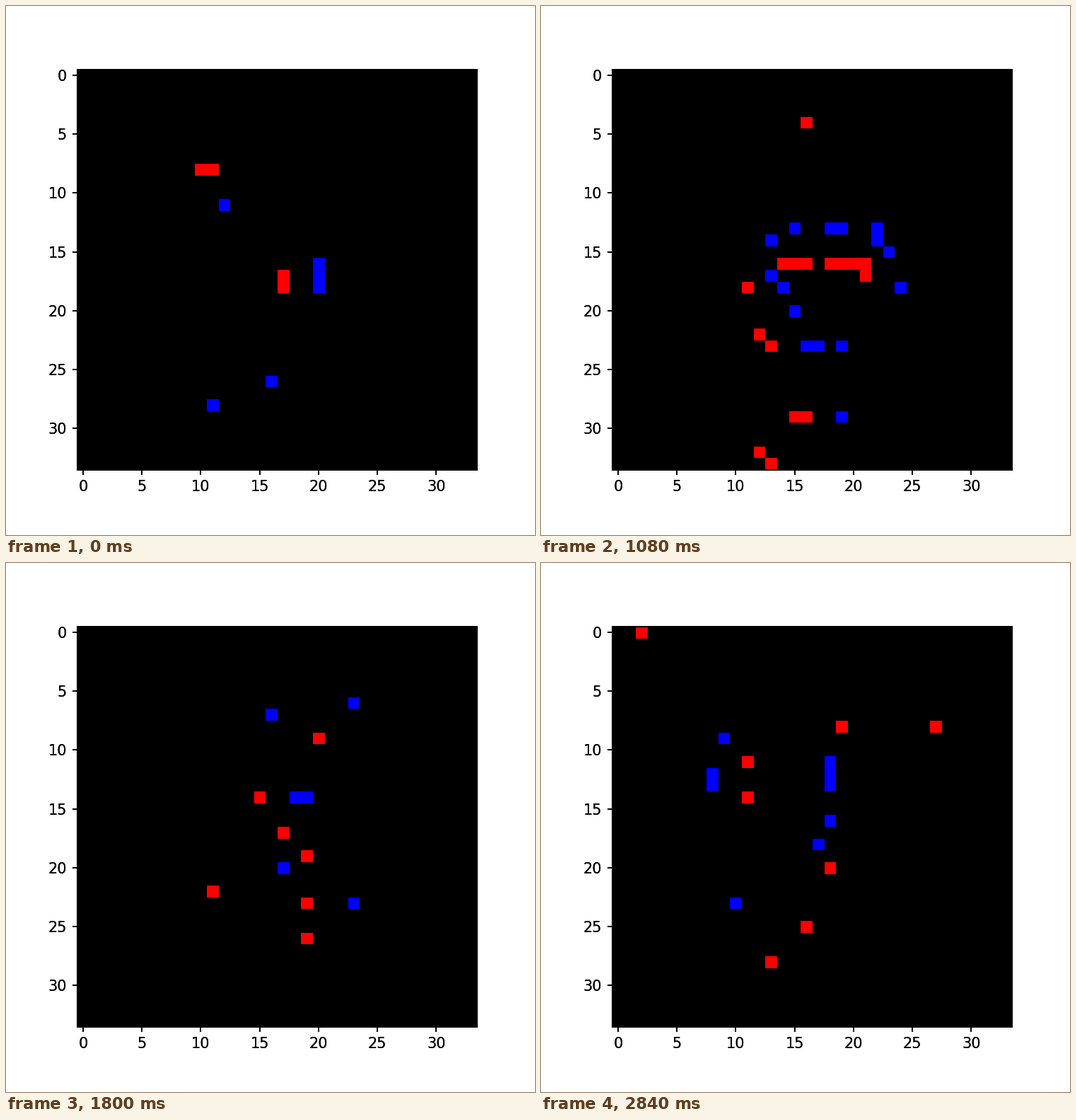
A matplotlib script for the animation above (2.88 s loop, 748 by 748 pixels).

```python
import numpy as np
import matplotlib.pyplot as plt
from matplotlib.animation import FuncAnimation

SIZE, GRID = 748, 34
FRAMES, STEP = 72, 40
SWEEP = FRAMES // 3
RED, BLUE = (255, 0, 0), (0, 0, 255)

# Centre line of the figure eight, as a closed loop of key points
EIGHT = np.array([
    (14.3, 10), (15.5, 8.7), (19, 8.6), (23, 8), (25, 10), (25, 13.5),
    (23.3, 17.5), (20, 20.3), (16.5, 22.3), (15.5, 24), (17, 25.8),
    (19.5, 25.6), (20.3, 23.5), (19.8, 21), (17.8, 17.5), (15.2, 13.7),
])
# The digit is swept around a triangle
CORNERS = np.array([(-5.2, 0.6), (-2.6, 6.2), (0.9, -0.6)])
INNER, OUTER = 0.75, 2.0    # distance of an edge from the centre line
FACING = 0.4                # how far an edge must face the motion

t = np.linspace(0, len(EIGHT), 300)
knots = np.arange(len(EIGHT) + 1)
LINE = np.column_stack([np.interp(t, knots, np.append(c, c[0])) for c in EIGHT.T])
ROWS, COLS = np.mgrid[:GRID, :GRID]
CELLS = np.stack([COLS, ROWS], axis=-1)


def ease(u):
    u = np.clip(u, 0, 1)
    return u * u * (3 - 2 * u)


def pose(leg, p):
    """Offset of the digit and its direction of travel."""
    a, b = CORNERS[leg], CORNERS[(leg + 1) % 3]
    return a + (b - a) * ease((p - 0.2) / 0.6), (b - a) / np.hypot(*(b - a))


def picture(i):
    rng = np.random.default_rng(100 + i)
    leg, step = divmod(i, SWEEP)
    p = step / SWEEP
    offset, heading = pose(leg, p)

    gap = CELLS[:, :, None] - (LINE + offset)
    dist = np.hypot(gap[..., 0], gap[..., 1])
    near = dist.argmin(axis=2)
    d = dist.min(axis=2)
    out = gap[ROWS, COLS, near] / np.maximum(d, 1e-6)[..., None]
    facing = out @ heading

    # Leading edges turn on (blue), trailing edges turn off (red)
    rate = 0.12 + 0.9 * np.exp(-((p - 0.39) / 0.17) ** 2 / 2)
    lit = (d > INNER) & (d < OUTER) & (rng.random(d.shape) < rate)
    img = np.zeros((GRID, GRID, 3), np.uint8)
    img[lit & (facing > FACING)] = BLUE
    img[lit & (facing < -FACING)] = RED

    for x, y in rng.integers(0, GRID, (rng.poisson(1), 2)):
        img[y, x] = RED
    return img


plt.rcParams.update({
    "font.family": "DejaVu Sans", "font.size": 15, "axes.linewidth": 1.44,
    "xtick.major.size": 5.25, "ytick.major.size": 5.25,
    "xtick.major.width": 1.44, "ytick.major.width": 1.44,
    "xtick.major.pad": 5.25, "ytick.major.pad": 5.25,
})
fig = plt.figure(figsize=(SIZE / 100, SIZE / 100), dpi=100, facecolor="white")
left, top, side = 100.55, 89.7, 565.9
box = [left / SIZE, 1 - (top + side) / SIZE, side / SIZE, side / SIZE]

# Two stacked axes give the labels their heavier look
for name in ("under", "over"):
    ax = fig.add_axes(box, label=name, facecolor="none")
    view = ax.imshow(picture(0), interpolation="nearest")
    ax.set_xticks(range(0, GRID, 5))
    ax.set_yticks(range(0, GRID, 5))


def update(i):
    view.set_data(picture(i))
    return [view]


anim = FuncAnimation(fig, update, frames=FRAMES, interval=STEP, repeat=True,
                     repeat_delay=0, blit=False)
plt.show()
```
